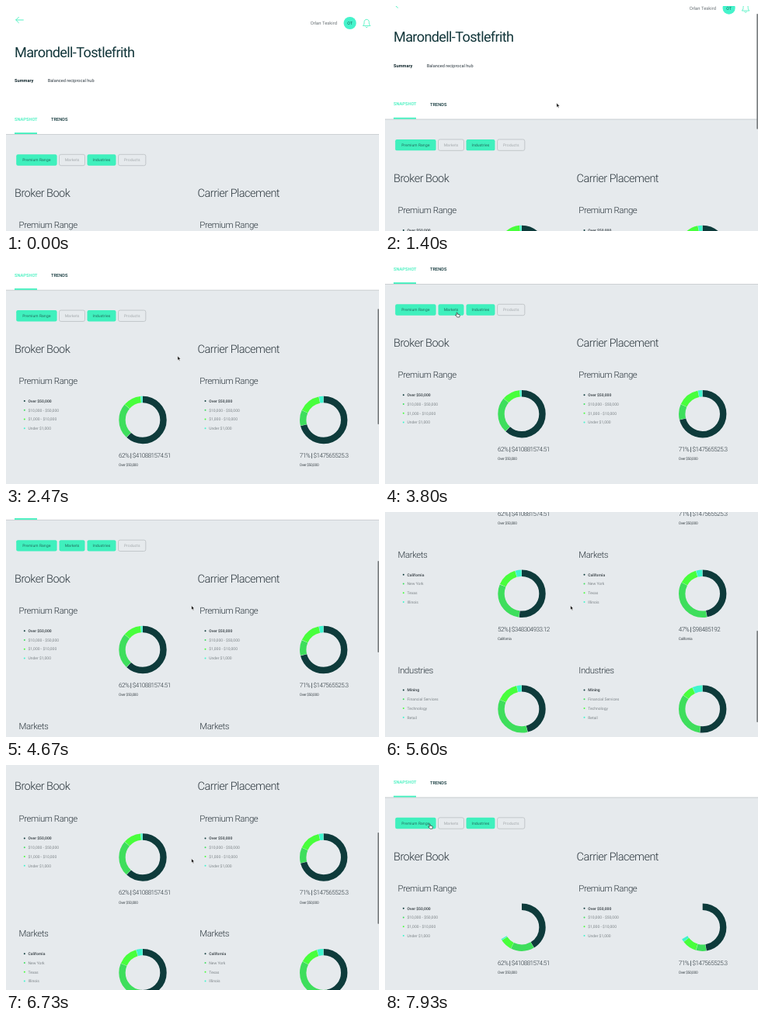
These frames come from a looping animation (480 px wide and 290 px high, 8 s). An HTML page:

```html
<!DOCTYPE html>
<html lang="en">
<head>
<meta charset="utf-8">
<title>Broker dashboard</title>
<style>
  html, body { margin: 0; width: 100%; height: 100%; overflow: hidden; background: #fff; }
  svg { display: block; width: 480px; height: 290px; font-family: Roboto, Arial, sans-serif; text-rendering: geometricPrecision; }
  .title { font-size: 18.1px; font-weight: 370; letter-spacing: -.035em; fill: #12363a; }
  .heading { font-size: 14.5px; font-weight: 350; letter-spacing: -.035em; fill: #2b363d; }
  .section { font-size: 11.4px; font-weight: 350; letter-spacing: -.035em; fill: #2b363d; }
  .body { font-size: 5.6px; fill: #2c3840; }
  .strong { font-size: 5.65px; font-weight: 700; fill: #10262c; }
  .tab { font-size: 5.7px; font-weight: 500; fill: #10363a; }
  .active { fill: #3ff0bd; }
  .user { font-size: 5.9px; fill: #6a7276; text-anchor: end; }
  .initials { font-size: 5.2px; fill: #14544c; text-anchor: middle; }
  .chip { font: 4.9px Inter, Arial, sans-serif; text-anchor: middle; }
  .legend { font-size: 5px; fill: #7f868a; }
  .first { font-weight: 600; fill: #4a5257; }
  .value { font-size: 8.1px; font-weight: 350; letter-spacing: -.065em; fill: #2b363d; }
  .bar { font-weight: 700; }
  .caption { font-size: 4.8px; letter-spacing: -.06em; fill: #444d52; }
</style>
</head>
<body>
<svg id="stage" viewBox="0 0 480 290"></svg>
<script>
const LOOP = 8000, VIEW = 290, PITCH = 148.7;
const MARKETS_ON = 2760, MARKETS_OFF = 7690, CHART_TIME = 1000;
const MINT = '#3ff0bd';
const COLORS = ['#0e3b3b', '#3ede5c', '#48ff3c', '#3ff5cd'];

const SCROLL = [[1070, 0], [1400, 19.3], [2470, 125.2], [2720, 133], [4380, 133], [4530, 140],
  [4670, 155], [5600, 376], [5880, 421], [6270, 335], [6730, 214], [7150, 123.5]];
const POINTER = [[70, 16, 194], [200, 85, 58], [270, 97, 86], [530, 97, 86], [800, 220.8, 125],
  [2540, 220.8, 125], [2720, 84, 66], [3730, 84, 66], [4250, 238.6, 120.5], [7180, 238.6, 120.5],
  [7420, 110, 51], [7620, 84, 74], [7720, 84, 74], [7900, 57, 76]];

const SECTIONS = [
  { name: 'Premium Range', legend: ['Over $50,000', '$10,000 - $50,000', '$1,000 - $10,000', 'Under $1,000'],
    charts: [[[62, 24.4, 12.2, 1.4], '$410881574.51'], [[71, 10.8, 15, 3.2], '$147565525.3']] },
  { name: 'Markets', legend: ['California', 'New York', 'Texas', 'Illinois'],
    charts: [[[52, 29.5, 14, 4.5], '$348304933.12'], [[47, 36, 12.5, 4.5], '$98485192']] },
  { name: 'Industries', legend: ['Mining', 'Financial Services', 'Technology', 'Retail'],
    charts: [[[46, 35.5, 15, 3.5], '$308114720.08'], [[52, 33, 8, 7], '$108961204.7']] },
];

function add(parent, tag, attrs = {}, text) {
  const node = document.createElementNS('http://www.w3.org/2000/svg', tag);
  for (const key in attrs) node.setAttribute(key, attrs[key]);
  if (text) node.textContent = text;
  return parent.appendChild(node);
}
const label = (parent, cls, x, y, text) => add(parent, 'text', { class: cls, x, y }, text);

// Monotone cubic interpolation through [time, value...] keys.
function track(keys, t, k = 1) {
  const last = keys.length - 1;
  if (t <= keys[0][0]) return keys[0][k];
  if (t >= keys[last][0]) return keys[last][k];
  const rate = i => (keys[i + 1][k] - keys[i][k]) / (keys[i + 1][0] - keys[i][0]);
  const slope = i => {
    if (i === 0 || i === last) return 0;
    const a = rate(i - 1), b = rate(i);
    return a * b <= 0 ? 0 : 2 * a * b / (a + b);
  };
  const i = keys.findIndex(key => key[0] > t) - 1;
  const span = keys[i + 1][0] - keys[i][0], u = (t - keys[i][0]) / span;
  return keys[i][k] * (1 - u) ** 2 * (1 + 2 * u) + keys[i + 1][k] * u * u * (3 - 2 * u)
    + span * (slope(i) * u * (1 - u) ** 2 - slope(i + 1) * u * u * (1 - u));
}

const stage = document.getElementById('stage');
const page = add(stage, 'g');
const donuts = [];

function buildHeader() {
  add(page, 'rect', { width: 480, height: 165.5, fill: '#fff' });
  add(page, 'rect', { y: 165, width: 480, height: 800, fill: '#e6eaed' });
  add(page, 'rect', { y: 165, width: 480, height: 1, fill: '#cdd1d4' });
  const line = { fill: 'none', stroke: MINT, 'stroke-width': .9, 'stroke-linecap': 'round', 'stroke-linejoin': 'round' };
  add(page, 'path', { ...line, d: 'M22.3 18H12.8M16.4 14.3L12.7 18L16.4 21.7' });
  label(page, 'user', 426, 24.2, 'Orlan Teskird');
  add(page, 'circle', { cx: 442.6, cy: 22, r: 8.1, fill: '#45f3cb' });
  label(page, 'initials', 442.6, 23.9, 'OT');
  add(page, 'path', { ...line, 'stroke-width': .8,
    d: 'M459.6 25.2C461 24 461 22.5 461 20.6C461 16.2 467.2 16.2 467.2 20.6C467.2 22.5 467.2 24 468.6 25.2ZM462.8 27C463.2 28 465 28 465.4 27' });
  label(page, 'title', 11, 65.6, 'Marondell-Tostlefrith');
  label(page, 'strong', 11, 98.4, 'Summary');
  label(page, 'body', 53.8, 98.4, 'Balanced reciprocal hub');
  label(page, 'tab active', 11, 147.8, 'SNAPSHOT');
  label(page, 'tab', 58, 148.3, 'TRENDS');
  add(page, 'rect', { x: 11, y: 163.2, width: 29, height: 1.8, fill: MINT });
  label(page, 'heading', 11, 246, 'Broker Book');
  label(page, 'heading', 246.6, 246, 'Carrier Placement');
}

function buildChip([name, x, width]) {
  const box = add(page, 'rect', { x, y: 191.3, width, height: 14.4, rx: 2.2, 'stroke-width': .7 });
  const text = label(page, 'chip', x + width / 2, 200.3, name);
  return on => {
    box.setAttribute('fill', on ? MINT : 'none');
    box.setAttribute('stroke', on ? 'none' : '#b4b9bc');
    text.setAttribute('fill', on ? '#22695c' : '#a2a7aa');
  };
}

function buildDonut(parent, cx, shares) {
  let start = 0;
  shares.forEach((share, i) => {
    const arc = add(parent, 'circle', { cx, cy: 332.7, r: 26.5, fill: 'none', stroke: COLORS[i],
      'stroke-width': 8.4, pathLength: 100, transform: `rotate(-90 ${cx} 332.7)` });
    donuts.push({ arc, start, share });
    start += share;
  });
}

function buildSection({ name, legend, charts }) {
  const group = add(page, 'g');
  charts.forEach(([shares, amount], column) => {
    const half = add(group, 'g', { transform: `translate(${column * 232.7} 0)` });
    label(half, 'section', 16.6, 286.4, name);
    legend.forEach((text, i) => {
      const y = 308.3 + i * 11.75;
      add(half, 'circle', { cx: 23.8, cy: y, r: 1, fill: COLORS[i] });
      label(half, i ? 'legend' : 'legend first', 28.5, y + 1.8, text);
    });
    buildDonut(half, 176, shares);
    const value = label(half, 'value', 145, 381.2, shares[0] + '% ');
    add(value, 'tspan', { class: 'bar' }, '|');
    add(value, 'tspan', {}, ' ' + amount);
    label(half, 'caption', 145, 392.4, legend[0]);
  });
  return group;
}

buildHeader();
const chips = [['Premium Range', 13.2, 52.4], ['Markets', 68.5, 33], ['Industries', 104.5, 37], ['Products', 144.6, 35.2]].map(buildChip);
[true, false, true, false].forEach((on, i) => chips[i](on));
const sections = SECTIONS.map(buildSection);
const thumb = add(stage, 'rect', { x: 478.3, width: 1.7, rx: .8, fill: '#7a7e80' });

const pointer = add(stage, 'g');
const ink = { fill: '#111', stroke: '#fff', 'stroke-width': .6, 'stroke-linejoin': 'round' };
const arrow = add(pointer, 'path', { ...ink, d: 'M0 0V5.6L1.3 4.5L2.2 6.5L3.2 6L2.3 4.1H4Z' });
const hand = add(pointer, 'path', { ...ink, fill: '#fff', stroke: '#111',
  d: 'M.2 .4Q.8 -.3 1.3 .5V2.3L4 2.9Q4.6 3.2 4.4 4L3.9 6.2H1L-1.3 3.6Q-1.1 2.8 .2 3.7Z' });

function barOpacity(t) {
  const scrolled = t < 4380 ? [1070, 2720] : [4380, 7150];
  return t < scrolled[0] ? 0 : Math.max(0, Math.min(1, (scrolled[1] + 650 - t) / 200));
}

function chartProgress(t) {
  const click = t >= MARKETS_OFF ? MARKETS_OFF : t >= MARKETS_ON ? MARKETS_ON : -CHART_TIME;
  return 1 - (1 - Math.min(1, (t - click) / CHART_TIME)) ** 4;
}

function render(t) {
  const scroll = track(SCROLL, t);
  const markets = t >= MARKETS_ON && t < MARKETS_OFF;
  page.setAttribute('transform', `translate(0 ${-scroll})`);
  chips[1](markets);
  sections[1].setAttribute('visibility', markets ? 'visible' : 'hidden');
  sections[1].setAttribute('transform', `translate(0 ${PITCH})`);
  sections[2].setAttribute('transform', `translate(0 ${PITCH * (markets ? 2 : 1)})`);

  const progress = chartProgress(t);
  for (const { arc, start, share } of donuts) {
    arc.setAttribute('stroke-dasharray', `${Math.max(0, share * progress - .2)} 200`);
    arc.setAttribute('stroke-dashoffset', -start * progress);
  }

  const height = markets ? 713 : 565;
  thumb.setAttribute('y', scroll * VIEW / height);
  thumb.setAttribute('height', VIEW * VIEW / height);
  thumb.setAttribute('opacity', barOpacity(t));

  const x = track(POINTER, t, 1), y = track(POINTER, t, 2);
  const overChip = x > 13 && x < 102 && Math.abs(y + scroll - 198.5) < 7.3;
  pointer.setAttribute('transform', `translate(${x} ${y})`);
  pointer.setAttribute('visibility', t < 70 ? 'hidden' : 'visible');
  arrow.setAttribute('display', overChip ? 'none' : 'inline');
  hand.setAttribute('display', overChip ? 'inline' : 'none');
}

const begin = performance.now();
function tick() {
  render((performance.now() - begin) % LOOP);
  requestAnimationFrame(tick);
}
tick();
</script>
</body>
</html>
```
